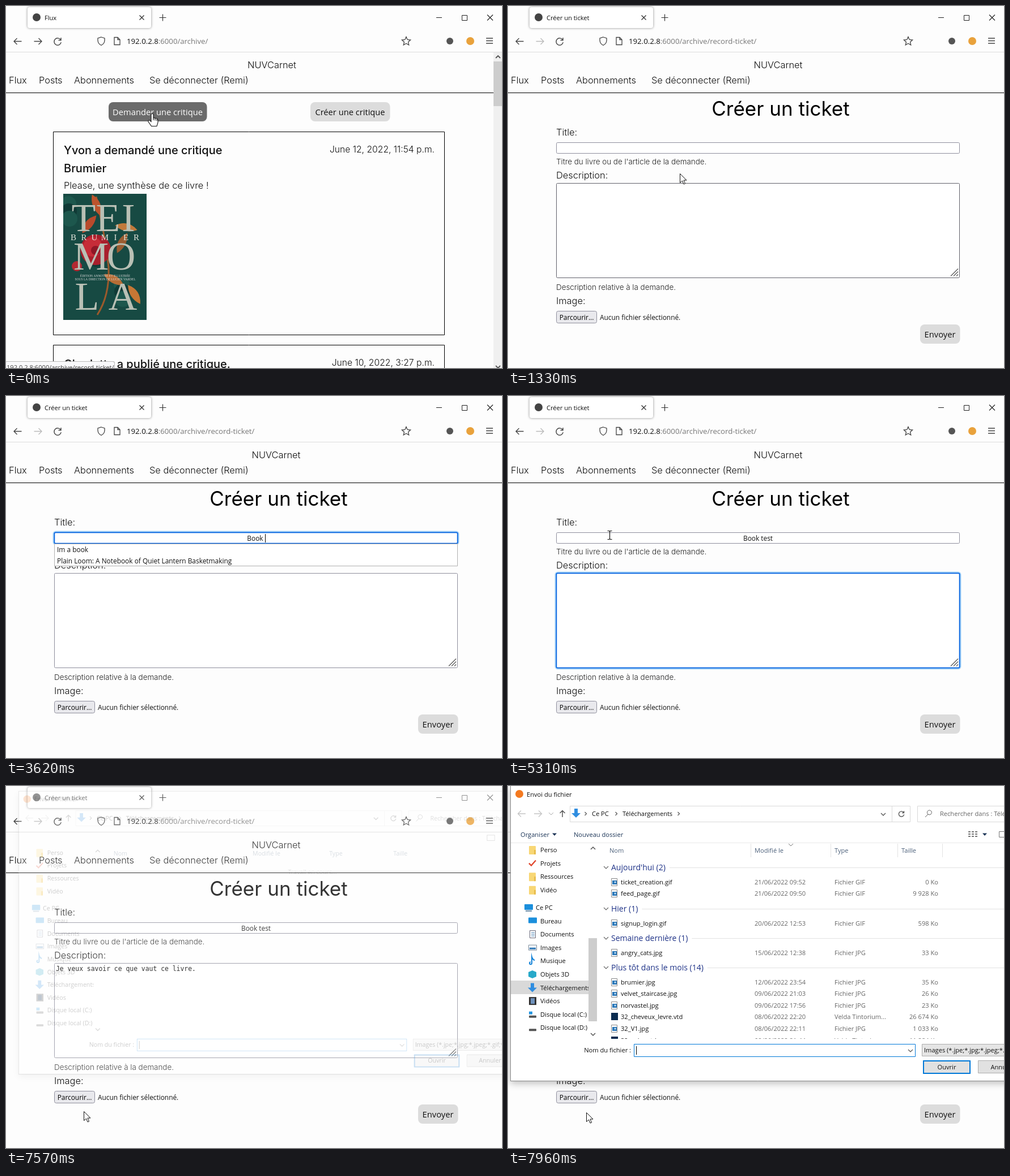
An HTML page with a canvas for the animation above (8000 ms loop, 875 by 640 pixels).

```html
<!DOCTYPE html>
<html lang="fr">
<head>
<meta charset="utf-8">
<style>
html, body { margin: 0; width: 100%; height: 100%; overflow: hidden; background: #fdfdfd; }
canvas { display: block; }
</style>
</head>
<body>
<canvas id="stage" width="875" height="640"></canvas>
<script>
const c = document.getElementById('stage').getContext('2d');
const LOOP = 8000;
const PAPER = '#fdfdfd', INK = '#111', BORDER = '#8f8f9d', BLUE = '#0060df';
const body = (size, weight) => `${weight} ${size}px Inter, sans-serif`;
const ui = size => `${size}px "Open Sans", "Noto Sans", sans-serif`;
const MONO = '11.4px "DejaVu Sans Mono", monospace';
const LABEL = body(16.4, 300), HINT = body(13.4, 300), HEADING = body(20, 500), DATE = body(15.7, 300);

function text(s, x, y, font, color = INK, align = 'left') {
  c.font = font;
  c.fillStyle = color;
  c.textAlign = align;
  c.fillText(s, x, y);
}
function fill(x, y, w, h, color, r = 0) {
  c.fillStyle = color;
  c.beginPath();
  c.roundRect(x, y, w, h, r);
  c.fill();
}
function frame(x, y, w, h, color, width = 1, r = 0) {
  c.strokeStyle = color;
  c.lineWidth = width;
  c.beginPath();
  c.roundRect(x, y, w, h, r);
  c.stroke();
}
function dot(x, y, r, color) {
  c.fillStyle = color;
  c.beginPath();
  c.arc(x, y, r, 0, 7);
  c.fill();
}
// SVG path stroked (and optionally filled) at an offset
function path(d, x, y, stroke, width = 1.3, inside) {
  c.save();
  c.translate(x, y);
  const p = new Path2D(d);
  if (inside) { c.fillStyle = inside; c.fill(p); }
  if (stroke) { c.strokeStyle = stroke; c.lineWidth = width; c.stroke(p); }
  c.restore();
}
const CHEVRON = { down: 'M-4-2L0 2L4-2', up: 'M-4 2L0-2L4 2', right: 'M-1.5-3L1.5 0L-1.5 3' };
const CROSS = 'M-4-4L4 4M4-4L-4 4';
const ARROW_LEFT = 'M7 0H-6M-1-5.5L-6.5 0L-1 5.5';
const ARROW_RIGHT = 'M-7 0H6M1-5.5L6.5 0L1 5.5';
const ARROW_UP = 'M0 6V-5M-4.5-1L0-5.5L4.5-1';
const RELOAD = 'M5.5-3A6.2 6.2 0 1 0 6.2 1M6-7V-2.5H1.5';
const BIG_ARROW = 'M-3-8H3V0H8L0 8L-8 0H-3Z';

// Pointer: time, x, y
const TRACK = [
  [0, 258, 190], [660, 258, 190], [1190, 306, 330], [1300, 306, 330], [1330, 303, 296],
  [1450, 290, 247], [1670, 290, 247], [1850, 235, 325], [2030, 179, 250], [4950, 179, 250],
  [5000, 179, 246], [5310, 179, 246], [5780, 185, 430], [5930, 185, 430], [6250, 150, 580],
  [6570, 123, 555], [7290, 123, 555], [7500, 137, 575], [7930, 137, 575], [7960, 138, 577], [LOOP, 138, 577]
];
function pointerAt(t) {
  const i = Math.max(1, TRACK.findIndex(k => k[0] >= t));
  const [t0, x0, y0] = TRACK[i - 1], [t1, x1, y1] = TRACK[i];
  const p = Math.min(1, Math.max(0, (t - t0) / (t1 - t0)));
  const e = p * p * (3 - 2 * p);
  return [x0 + (x1 - x0) * e, y0 + (y1 - y0) * e];
}
const within = ([x, y], l, t, r, b) => x >= l && x <= r && y >= t && y <= b;
const overInput = p => within(p, 85, 241, 797, 261);
const overArea = p => within(p, 85, 313, 797, 481);

const PAGE_AT = 720, FOCUS_AT = 2180, TAB_AT = 4270, TEXT_AT = 5930, BLUR_AT = 6820, DIALOG_AT = 7530;
const KEYS = [3030, 3210, 3330, 3450, 3620, 3750, 3850, 3950, 4060];

function pointer(t) {
  if (t >= 3030 && t < 4950) return;
  const p = pointerAt(t), [x, y] = p.map(Math.round);
  if (t < PAGE_AT) {
    path('M-2 1.5Q0-1 2 1.5V7.5L8 9Q10 9.5 10 12V16L8 22.5H-1.5L-7 14.5Q-7.5 11.5-4.5 12L-2 14.5Z M2 8V12M5 9V12.5M8 10V13',
      x, y, '#111', 1.1, '#fff');
  } else if (overInput(p) || overArea(p)) {
    path('M-4-7.5H-1L0-6.5L1-7.5H4M0-6.5V6.5M-4 7.5H-1L0 6.5L1 7.5H4', x + .5, y, '#111', 1.2);
  } else {
    path('M0 0V16L4 12.5L6.5 18.5L9 17.5L6.5 11.5H11.5Z', x + .5, y + .5, '#111', 1, '#fff');
  }
}

function chrome(t) {
  const form = t >= PAGE_AT, inactive = t >= 7500;
  const tone = inactive ? '#777' : '#222';
  fill(0, 0, 875, 640, PAPER);
  c.save();
  c.shadowColor = 'rgba(0,0,0,.45)';
  c.shadowBlur = 4;
  fill(38, 2, 218, 37, '#fff', 4);
  c.restore();
  dot(54, 20, 7, inactive ? '#777' : '#444');
  text(form ? 'Créer un ticket' : 'Flux', 68, 25, ui(11.1), inactive ? '#555' : INK);
  path(CROSS, 239.5, 20.5, '#333', 1.3);
  path('M-6 0H6M0-6V6', 276.5, 20.5, '#333', 1.2);
  path('M-5 0H5', 764, 20.5, tone, 1);
  frame(804.5, 16.5, 9, 9, tone);
  path('M-5-5L5 5M5-5L-5 5', 854, 20.5, tone, 1.1);

  path(ARROW_LEFT, 20.5, 62.5, '#444');
  path(ARROW_RIGHT, 56.5, 62.5, form ? '#bbb' : '#444');
  path(RELOAD, 91, 63, '#444', 1.4);
  path('M0-7L6-5V-1Q5.5 5 0 7.5Q-5.5 5-6-1V-5Z', 168, 62, '#444');
  path('M-5-6.5H1L5-2.5V6.5H-5ZM1-6.5V-2.5H5', 196, 62, '#444');
  const host = '192.0.2.8';
  text(host, 213, 67, ui(13.2), INK);
  text(':6000/archive/' + (form ? 'record-ticket/' : ''), 213 + c.measureText(host).width, 67, ui(13.2), '#777');
  let star = '';
  for (let i = 0; i < 10; i++) {
    const a = -Math.PI / 2 + i * Math.PI / 5, r = i % 2 ? 3.7 : 8;
    star += (i ? 'L' : 'M') + r * Math.cos(a) + ' ' + r * Math.sin(a);
  }
  path(star + 'Z', 706, 62.5, '#444');
  dot(783, 62, 6, '#555');
  dot(819, 62, 7, '#e9a23c');
  path('M-6-4.5H6M-6 0H6M-6 4.5H6', 853, 61.5, '#444');
  fill(0, 81, 875, 1, '#ddd');
}

function nav(width) {
  text('NUVCarnet', width / 2 + 39, 110, LABEL, INK, 'center');
  [['Flux', 5], ['Posts', 58], ['Abonnements', 120], ['Se déconnecter (Remi)', 253]]
    .forEach(([s, x]) => text(s, x, 137, LABEL));
  fill(0, 153, width, 1, '#000');
}

function cover() {
  c.save();
  c.beginPath();
  c.rect(101, 332, 147, 223);
  c.clip();
  fill(101, 332, 147, 223, '#174a43');
  for (let i = 0; i < 9; i++) dot(110 + i * 47 % 140, 350 + i * 71 % 200, 14, i % 2 ? '#103a36' : '#1d574d');
  path('M58 5Q75 80 80 130Q82 180 60 214', 101, 332, '#9b5a2c', 3);
  const leaf = (x, y, a, color) => {
    c.save();
    c.translate(x, y);
    c.rotate(a);
    path('M-20 0Q0-15 20 0Q0 12-20 0Z', 0, 0, null, 0, color);
    c.restore();
  };
  leaf(212, 392, .2, '#c17a3c');
  leaf(205, 419, -1.1, '#9a5d32');
  leaf(190, 484, .5, '#b76d35');
  leaf(226, 510, 1, '#c77735');
  leaf(159, 352, 1.2, '#bd542e');
  leaf(147, 386, -.9, '#b84a2c');
  dot(158, 431, 27, '#a91f2c');
  dot(153, 426, 17, '#c62c38');
  dot(158, 432, 8, '#8f1726');
  dot(125, 460, 9, '#b32932');
  const big = '70px "Liberation Serif", serif', pale = '#b9c0b5';
  [['T', 137, 398], ['E', 180, 398], ['I', 216, 398], ['M', 150, 466], ['O', 203, 466], ['L', 143, 537], ['A', 206, 537]]
    .forEach(([s, x, y]) => text(s, x, y, big, pale, 'center'));
  [...'BRUMIER'].forEach((s, i) => text(s, 119 + i * 18.5, 414, '15px "Liberation Serif", serif', '#e3e5dc', 'center'));
  text('ÉDITION ANNOTÉE ET ILLUSTRÉE', 175, 479, '5.5px "Liberation Serif", serif', '#ddd', 'center');
  text('SOUS LA DIRECTION DE LUCIEN VARDEL', 175, 485, '5.5px "Liberation Serif", serif', '#ddd', 'center');
  c.restore();
}

function feed() {
  nav(860);
  fill(181, 170, 173.5, 34, '#6b6b6b', 8);
  text('Demander une critique', 267.5, 193, ui(14.7), '#fff', 'center');
  fill(537, 170, 140.5, 34, '#dcdcdc', 8);
  text('Créer une critique', 607, 193, ui(14.7), INK, 'center');
  frame(83.5, 222.5, 690, 359, '#000');
  text('Yvon a demandé une critique', 102, 262, HEADING);
  text('June 12, 2022, 11:54 p.m.', 756, 259, DATE, INK, 'right');
  text('Brumier', 102, 294, HEADING);
  text('Please, une synthèse de ce livre !', 102, 323, LABEL);
  cover();
  frame(83.5, 599.5, 690, 80, '#000');
  text('Charlotte a publié une critique.', 102, 640, HEADING);
  text('June 10, 2022, 3:27 p.m.', 756, 636, DATE, INK, 'right');

  fill(860, 82, 15, 558, '#f0f0f0');
  fill(860, 98, 15, 79, '#cdcdcd');
  path(CHEVRON.up, 868, 90, '#555', 1.8);
  path(CHEVRON.down, 868, 638, '#555', 1.8);
  fill(-1, 628, 193, 14, '#bbb', 3);
  fill(-1, 629, 192, 14, '#f9f9fb', 3);
  text('192.0.2.8:6000/archive/record-ticket/', 1, 643, ui(11.1), '#444');
}

function field(x, y, w, h, focused, hovered) {
  if (focused) {
    frame(x - 1.5, y - 1.5, w + 3, h + 3, '#a6d3f7', 3, 4);
    frame(x, y, w, h, BLUE, 2, 2);
    fill(x + 1, y + 1, w - 2, h - 2, '#fff');
  } else {
    fill(x, y, w, h, '#fff', 2);
    frame(x, y, w, h, hovered ? '#62626b' : BORDER, 1, 2);
  }
}
function form(t) {
  const trail = pointerAt(t - 35), active = t < 3030 || t >= 4950;
  nav(875);
  text('Créer un ticket', 481, 194, body(35, 400), '#000', 'center');
  text('Title:', 85, 229, LABEL);
  text("Titre du livre ou de l'article de la demande.", 85, 280, HINT, '#222');
  text('Description:', 85, 305, LABEL);
  text('Description relative à la demande.', 85, 502, HINT, '#222');
  text('Image:', 85, 527, LABEL);

  const typing = t >= FOCUS_AT && t < TAB_AT, inArea = t >= TAB_AT && t < BLUR_AT;
  const count = KEYS.filter(k => t >= k).length, title = 'Book test'.slice(0, count);
  field(85.5, 241.5, 711, 19, typing, active && overInput(trail) && t < 5000);
  text(title, 441, 256, ui(11.9), INK, 'center');
  if (typing && !(t >= 2840 && t < 3030)) {
    fill(Math.round(441 + c.measureText(title).width / 2), 244, 1, 15, '#000');
  }
  field(85.5, 313.5, 711, 167, inArea, active && overArea(trail));
  path('M-6 6L7-7M-1 6L7-2M4 6L7 3', 787, 471.5, '#555', 1.1);
  if (t >= TEXT_AT) text('Je veux savoir ce que vaut ce livre.', 88, 327, MONO, '#000');
  if (inArea && t < 5000) fill(88, 316, 1, 14, '#000');
  if (t >= TEXT_AT && t < 6300) fill(335, 316, 1, 14, '#000');

  if (count > 1 && count < 6) {
    fill(85, 261, 712, 40, '#fff');
    frame(85.5, 261.5, 711, 39, '#b0b0b0');
    text('Im a book', 90, 276, ui(11.9));
    text('Plain Loom: A Notebook of Quiet Lantern Basketmaking', 90, 296, ui(11.9));
  }

  fill(85.5, 539.5, 71, 21, within(pointerAt(t), 85, 539, 157, 560) ? '#d0d0d7' : '#e9e9ed', 3);
  frame(85.5, 539.5, 71, 21, BORDER, 1, 3);
  text('Parcourir...', 121, 555, ui(11.9), '#000', 'center');
  text('Aucun fichier sélectionné.', 162, 555, ui(11.9));
  fill(727, 563, 70.5, 34, '#dcdcdc', 8);
  text('Envoyer', 762, 586, ui(14.7), INK, 'center');
}

const PLACES = ['Perso', 'Projets', 'Ressources', 'Vidéo', 'Ce PC', 'Bureau', 'Documents', 'Images', 'Musique',
  'Objets 3D', 'Téléchargements', 'Vidéos', 'Disque local (C:)', 'Disque local (D:)'];
const GROUPS = [
  [144, "Aujourd'hui (2)", [['ticket_creation.gif', '21/06/2022 09:52', '0 Ko'], ['feed_page.gif', '21/06/2022 09:50', '9 928 Ko']]],
  [217, 'Hier (1)', [['signup_login.gif', '20/06/2022 12:53', '598 Ko']]],
  [269, 'Semaine dernière (1)', [['angry_cats.jpg', '15/06/2022 12:38', '33 Ko']]],
  [321, 'Plus tôt dans le mois (14)', [['brumier.jpg', '12/06/2022 23:54', '35 Ko'],
    ['velvet_staircase.jpg', '09/06/2022 21:03', '26 Ko'], ['norvastel.jpg', '09/06/2022 17:56', '23 Ko'],
    ['32_cheveux_levre.vtd', '08/06/2022 22:20', '26 674 Ko'], ['32_V1.jpg', '08/06/2022 22:11', '1 033 Ko'],
    ['32_color.vtd', '08/06/2022 21:44', '11 284 Ko']]]
];
const SMALL = ui(11.1);

function placeIcon(i, x, y) {
  if (i === 1) path('M-6 0L-2 4L6-5', x, y, '#e0452b', 2.2);
  else if (i < 4) { fill(x - 6, y - 7, 12, 15, '#f8d775', 1); fill(x + 3, y, 3, 8, '#e9bd4d'); }
  else if (i === 4 || i === 5) { fill(x - 7, y - 6, 15, 10, '#1b8fdc', 1); if (i === 4) fill(x - 5, y + 5, 11, 2, '#6b8da8'); }
  else if (i === 6) { frame(x - 4.5, y - 6.5, 10, 13, '#667'); path('M-2-3H4M-2 0H4M-2 3H4', x, y, '#4a83b5', 1); }
  else if (i === 7) { frame(x - 6.5, y - 4.5, 14, 9, '#789'); fill(x - 5, y, 11, 3, '#2f78b7'); }
  else if (i === 8) path('M-1 4V-7Q0-3 4-1M-1 4A2 2 0 1 1-3 2', x, y, '#1684d8', 2);
  else if (i === 9) path('M0-7L7-4V4L0 7L-7 4V-4Z', x, y, null, 0, '#28a9c9');
  else if (i === 10) path(BIG_ARROW, x, y, null, 0, '#2f8de0');
  else if (i === 11) { fill(x - 6, y - 7, 13, 14, '#333'); fill(x - 3, y - 5, 7, 10, '#6f92bd'); }
  else { fill(x - 6, y + 2, 13, 4, '#555', 1); if (i === 12) fill(x - 6, y - 5, 6, 5, '#2596e1'); }
}

function files() {
  c.save();
  c.beginPath();
  c.rect(160, 126, 715, 321);
  c.clip();
  for (const [y, label, rows] of GROUPS) {
    path(CHEVRON.down, 173, y, '#666', 1.1);
    text(label, 182, y + 5, ui(14), '#1e3287');
    fill(182 + c.measureText(label).width + 7, y, 700, 1, '#e2e2e2');
    rows.forEach(([name, date, size], i) => {
      const yy = y + 25.5 + i * 20.6, plain = name.endsWith('vtd'), top = Math.round(yy) - 7;
      if (plain) fill(182, top, 12, 13, '#0b2c50');
      else {
        frame(182.5, top + .5, 10, 13, '#8a8a8a');
        fill(184, top + 4, 8, 7, '#2b78b9');
        dot(189, top + 7, 1.5, '#cfe7f8');
      }
      const type = plain ? 'Velda Tintorium...' : 'Fichier ' + name.slice(-3).toUpperCase();
      text(name, 199, yy + 4, SMALL);
      text(date, 435, yy + 4, SMALL, '#666');
      text(type, 576, yy + 4, SMALL, '#666');
      text(size, 759, yy + 4, SMALL, '#666', 'right');
    });
  }
  c.restore();
}

// Shadow kept outside the window so that it does not tint a translucent one
function windowShadow() {
  c.save();
  c.beginPath();
  c.rect(-100, -100, 1200, 900);
  c.rect(4, -2, 920, 523);
  c.clip('evenodd');
  c.shadowColor = 'rgba(0,0,0,.25)';
  c.shadowBlur = 12;
  c.shadowOffsetY = 5;
  fill(4, -2, 920, 523, '#fff');
  c.restore();
}

function dialog(t) {
  const p = Math.min(1, (t - DIALOG_AT) / 240), loaded = t >= 7700, scale = .95 + .05 * p;
  c.save();
  c.globalAlpha = Math.min(1, p * 1.2);
  c.translate(436, 234);
  c.scale(scale, scale);
  c.translate(-436, -234);

  windowShadow();
  fill(4, -2, 920, 523, '#fff');
  frame(4.5, -.5, 920, 522, '#888');
  dot(20, 14, 7, '#f47a20');
  text('Envoi du fichier', 33, 18.5, SMALL);
  path(ARROW_LEFT, 24, 49, '#c5c5c5');
  path(ARROW_RIGHT, 53, 49, '#c5c5c5');
  path(CHEVRON.down, 76, 49, '#aaa', 1);
  path(ARROW_UP, 96, 49, '#555', 1.5);
  frame(109.5, 35.5, 600, 28, '#d9d9d9');
  fill(677, 36, 1, 28, '#d9d9d9');
  path(BIG_ARROW, 120, 48, null, 0, '#2f8de0');
  [137, 191, 301].forEach(x => path(CHEVRON.right, x, 49, '#555', 1.2));
  text('Ce PC', 148, 53, SMALL);
  text('Téléchargements', 202, 53, SMALL);
  path(CHEVRON.down, 662, 50, '#555', 1.3);
  c.save();
  c.translate(694, 49.5);
  c.scale(.75, .75);
  path(RELOAD, 0, 0, '#555', 1.8);
  c.restore();
  frame(722.5, 35.5, 200, 28, '#d9d9d9');
  path('M-6 6L-1 1M-1 1A4 4 0 1 1 5-4A4 4 0 0 1-1 1', 742, 49, '#666', 1);
  text('Rechercher dans : Téléchargements', 762, 53, SMALL, '#666');

  if (loaded) {
    text('Organiser', 22, 89.5, SMALL, '#1c3557');
    text('Nouveau dossier', 116, 89.5, SMALL, '#1c3557');
    [82, 841].forEach(x => path('M-4-2H4L0 2.5Z', x, 85.5, null, 0, '#1c3557'));
    path('M0 0H4M0 4H4M0 8H4M6 0H10M6 4H10M6 8H10M12 0H16M12 4H16M12 8H16', 812, 81, '#777', 2);
  }
  frame(866.5, 80.5, 14, 10, '#777');
  if (loaded) fill(5, 100, 900, 1, '#e8e8e8');

  c.save();
  c.beginPath();
  c.rect(5, 101, 137, 346);
  c.clip();
  if (loaded) fill(5, 344, 137, 24, '#d9d9d9');
  PLACES.forEach((name, i) => {
    const y = (i < 4 ? 113 : 120.5) + i * 23.6, root = i === 4;
    placeIcon(i, root ? 36 : 43, y);
    text(name, root ? 49 : 57, y + 4, SMALL);
  });
  c.restore();
  path(CHEVRON.up, 150, 110, '#555', 1.5);
  path(CHEVRON.down, 150, 439, '#555', 1.5);
  if (loaded) fill(142, 269, 15, 147, '#cdcdcd');

  [['Nom', 179], ['Modifié le', 435], ['Type', 576], ['Taille', 694]].forEach(([s, x]) => text(s, x, 118, SMALL, '#4c607a'));
  if (loaded) {
    [428, 569, 687, 766].forEach(x => fill(x, 102, 1, 24, '#e2e2e2'));
    path(CHEVRON.down, 499, 104, '#777', 1);
    files();
  } else text('Travail en cours...', 545, 153, SMALL, '#666', 'center');

  text('Nom du fichier :', 217, 471, SMALL, INK, 'right');
  fill(222, 456, 497, 23, '#fff');
  frame(222.5, 456.5, 496, 22, '#0078d7');
  fill(226, 460, 1, 15, '#000');
  path(CHEVRON.down, 710, 468, '#555', 1.2);
  fill(731, 457, 190, 21, '#e5e5e5');
  frame(730.5, 456.5, 190, 21, '#adadad');
  text('Images (*.jpe;*.jpg;*.jpeg;*.gif;*.png)', 734, 471, SMALL);
  fill(732, 485, 84, 23, '#e1e1e1');
  frame(733, 486, 82, 22, '#0078d7', 2);
  text('Ouvrir', 774, 500.5, SMALL, INK, 'center');
  fill(830, 485, 84, 23, '#e1e1e1');
  frame(829.5, 485.5, 84, 22, '#adadad');
  text('Annuler', 872, 500.5, SMALL, INK, 'center');
  c.restore();
}

function draw(now) {
  const t = now % LOOP;
  chrome(t);
  if (t < PAGE_AT) feed(); else form(t);
  if (t >= DIALOG_AT) dialog(t);
  pointer(t);
  requestAnimationFrame(draw);
}
requestAnimationFrame(draw);
</script>
</body>
</html>
```
